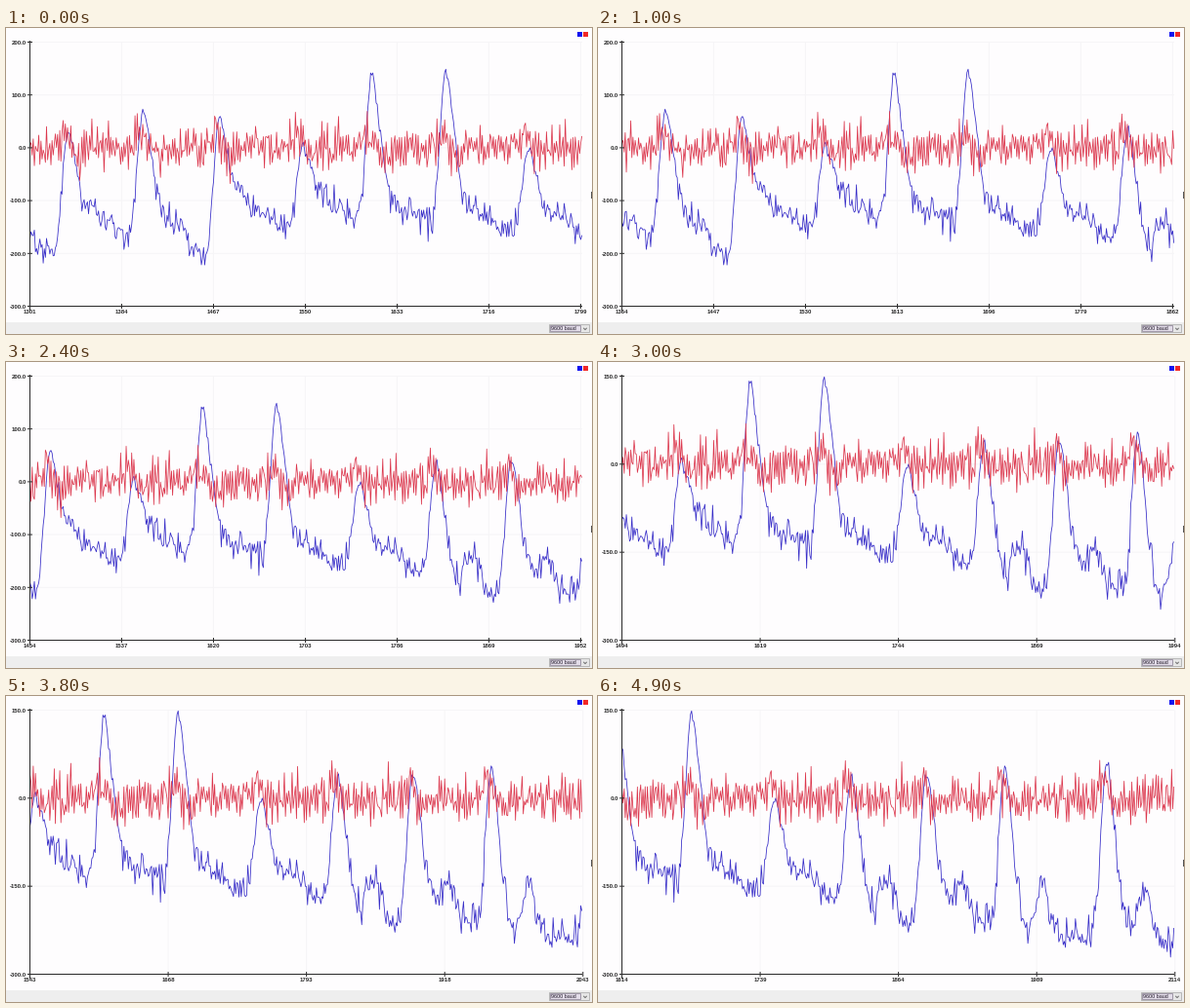
A matplotlib script for the animation above (5000 ms loop, 600 by 314 pixels).

```python
import numpy as np
import matplotlib.pyplot as plt
from matplotlib.animation import FuncAnimation
from matplotlib.patches import Rectangle

W, H, DPI = 600, 314, 100
FRAMES, INTERVAL = 50, 100
PX = 72 / DPI                     # one pixel in points
LEFT, RIGHT, TOP, BOTTOM = 24.5, 590, 14.5, 285.5
DX = 1.1325                       # pixels per sample
FIRST, WINDOW, COUNT = 1301, 500, 814
RESCALE_AT = 1480                 # first sample in view when the axes rescale
INK, GRID = "#2a2a2a", "#f6f5f7"

# Heartbeats: peak sample, peak level, level before, level after.
BEATS = np.array([
    (34, 30, -208, -130), (102, 72, -175, -140), (171, 52, -215, -95),
    (246, 2, -160, -95), (309, 135, -142, -118), (376, 144, -140, -128),
    (450, 0, -160, -130), (520, 32, -182, -195), (588, 45, -216, -180),
    (659, 50, -222, -238), (751, 60, -236, -230),
])


def make_signals():
    rng = np.random.default_rng(12)
    t = np.arange(COUNT)
    peaks, heights, before, after = BEATS.T

    # Resting level, with a small second hump after the deeper beats.
    at = np.column_stack([peaks - 12, peaks + 20]).ravel()
    level = np.column_stack([before, after]).ravel()
    rest = np.interp(t, [0, *at, COUNT], [-172, *level, -250])
    for peak, settle in zip(peaks, after):
        hump = 0.65 * max(0, -settle - 100)
        rest += hump * np.exp(-((t - peak - 34) / 8) ** 2)

    # Fast rise and slower fall towards each peak.
    blue = rest.copy()
    kick = np.zeros(COUNT)
    for peak, height in zip(peaks, heights):
        u = t - peak
        pulse = np.where(u < 0, np.exp(-(u / 7) ** 2),
                         np.exp(-(np.abs(u) / 11) ** 1.8))
        blue += (height - rest[peak]) * pulse
        kick += 28 * np.exp(-((u + 3) / 5) ** 2)
        kick -= 14 * np.exp(-((u - 11) / 6) ** 2)
    blue += rng.normal(0, 1, COUNT) * np.where(blue < -60, 14, 6)
    red = kick + 25 * np.sin(2.6 * t) + rng.normal(0, 14, COUNT)
    return blue, red


def first_sample(frame):
    times = [0, 10, 16, 24, 30, 38, 49]
    starts = [1301, 1364, 1402, 1454, 1494, 1543, 1614]
    return int(round(np.interp(frame, times, starts)))


blue, red = make_signals()
fig = plt.figure(figsize=(W / DPI, H / DPI), dpi=DPI)
ax = fig.add_axes([0, 0, 1, 1])
ax.set_xlim(0, W)
ax.set_ylim(H, 0)
ax.axis("off")


def box(x, y, w, h, color, edge="none", z=0):
    ax.add_patch(Rectangle((x, y), w, h, fc=color, ec=edge, lw=PX,
                           zorder=z, snap=False))


def line(xs, ys, color, lw=1, z=2):
    return ax.plot(xs, ys, color=color, lw=lw * PX, zorder=z, snap=False,
                   solid_capstyle="butt")[0]


def label(x, y, text, ha):
    return ax.text(x, y, text, ha=ha, va="center", color=INK, zorder=5,
                   family="Liberation Sans", weight="bold", size=6 * PX)


def draw_static():
    box(0, 0, W, H, "#fefdfe")
    box(0, 302, W, 12, "#eeeeee")
    box(585, 4, 5, 5, "#1414f0")
    box(591, 4, 5, 5, "#f02828")
    box(599, 168, 1, 7, "#555555")
    box(556.5, 304.5, 41, 8, "#e6e6e6", "#b8b8b8", 1)
    box(557.5, 305.5, 31, 6, "#e2dce8", "#a098a8", 2)
    ax.text(558.5, 308.7, "9600 baud", va="center", color="#201828",
            family="Liberation Sans", size=5.4 * PX, zorder=3)
    line([591.3, 593, 594.7], [307.8, 309.6, 307.8], "#555555", 0.8, 3)
    line([LEFT, LEFT], [13, 290], INK, z=4)
    line([22, RIGHT], [BOTTOM, BOTTOM], INK, z=4)


draw_static()
blue_line = line([], [], "#382ec8", 0.8, 2.5)
red_line = line([], [], "#dc384e", 0.8, 3)
ticks = []


def draw_ticks(start, top, y_step, x_step, to_y):
    while ticks:
        ticks.pop().remove()
    for level in range(-300, top + 1, y_step):
        y = to_y(level)
        ticks.append(line([LEFT, RIGHT], [y, y], GRID, z=1))
        ticks.append(line([22, 27], [y, y], INK, z=4))
        ticks.append(label(21, y + 0.8, f"{level:.1f}", "right"))
    for offset in range(0, WINDOW + 1, x_step):
        x = LEFT + offset * DX
        ticks.append(line([x, x], [TOP, BOTTOM], GRID, z=1))
        ticks.append(line([x, x], [283, 288], INK, z=4))
        ticks.append(label(x, 291.5, str(start + offset), "center"))


def update(frame):
    start = first_sample(frame)
    view = slice(start - FIRST, start - FIRST + WINDOW)
    if start >= RESCALE_AT:
        top, y_step, x_step = 150, 150, 125
    else:
        top, y_step, x_step = 200, 100, 83

    def to_y(level):
        return BOTTOM - (level + 300) * (BOTTOM - TOP) / (top + 300)

    draw_ticks(start, top, y_step, x_step, to_y)
    xs = LEFT + np.arange(WINDOW) * DX
    blue_line.set_data(xs, to_y(blue[view]))
    red_line.set_data(xs, to_y(red[view]))
    return [blue_line, red_line, *ticks]


anim = FuncAnimation(fig, update, frames=FRAMES, interval=INTERVAL,
                     repeat=True, repeat_delay=0, blit=False)
plt.show()
```
